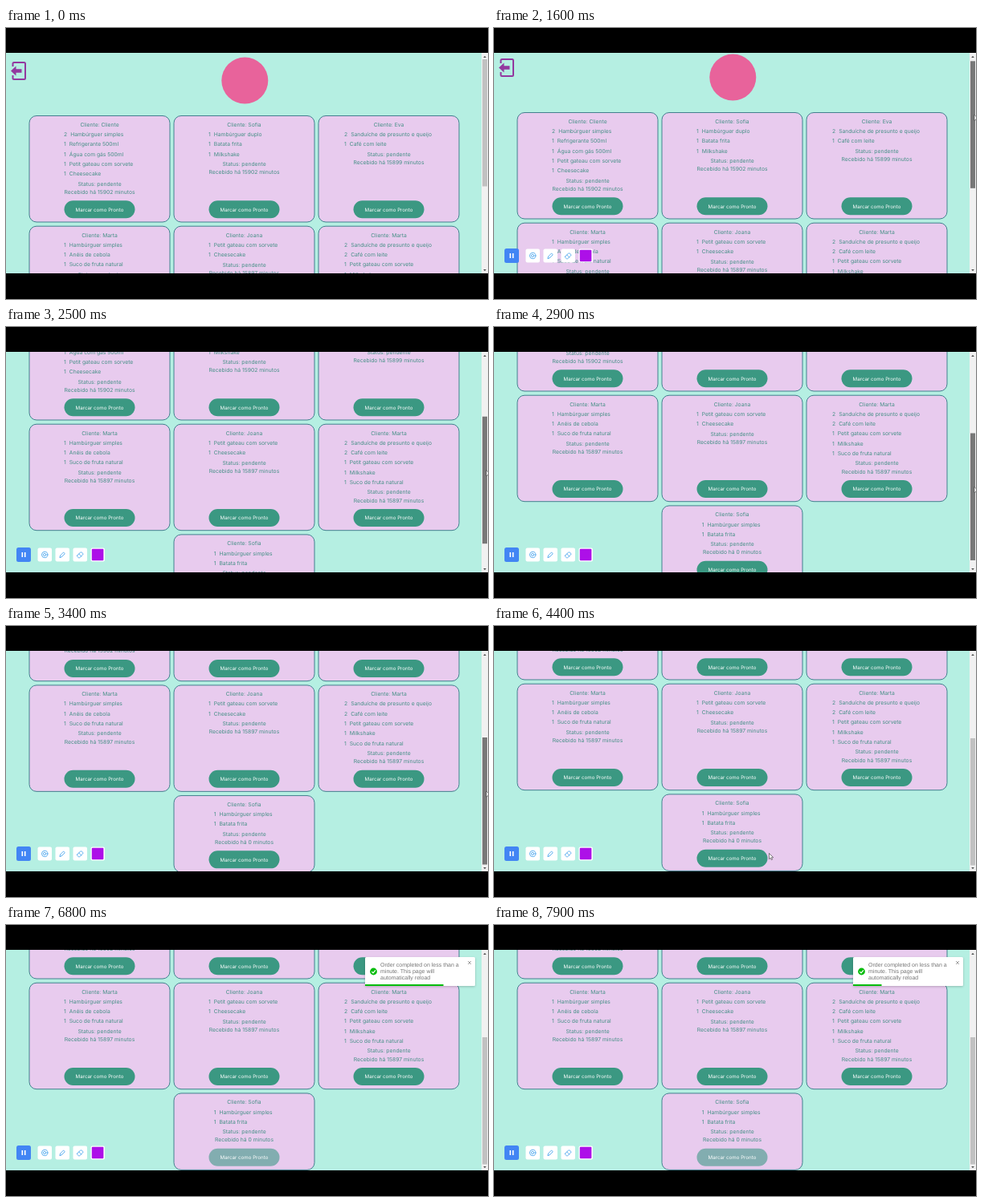
Animation of 600x338 px, one loop 8 s. Source, as an HTML page:

```html
<!DOCTYPE html>
<html lang="pt">
<head>
<meta charset="utf-8">
<title>Pedidos</title>
<style>
  html, body { margin: 0; width: 100%; height: 100%; overflow: hidden; background: #000; }
  svg { display: block; width: 100vw; height: 100vh; }
  text { font: 6.75px Inter, sans-serif; fill: #459086; text-rendering: geometricPrecision; }
  .mid { text-anchor: middle; }
  .card { fill: #e8cbee; stroke: #43808e; }
  .button { fill: #3b9882; }
  .label { font-size: 6.2px; fill: #fff; }
  .toast text { font: 7px "Liberation Sans", Arial, sans-serif; fill: #757575; }
  .line { fill: none; stroke: #4ba6ee; stroke-width: .9; stroke-linejoin: round; stroke-linecap: round; }
</style>
</head>
<body>
<svg viewBox="0 0 600 338">
  <defs>
    <clipPath id="view"><rect y="31" width="592" height="275"/></clipPath>
    <clipPath id="screen"><rect y="31" width="600" height="275"/></clipPath>
    <filter id="shadow" x="-10%" y="-30%" width="120%" height="170%">
      <feDropShadow dx="0" dy="1" stdDeviation="1.6" flood-opacity=".22"/>
    </filter>
  </defs>
  <rect width="600" height="338"/>
  <rect y="31" width="592" height="275" fill="#b5efe2"/>

  <g clip-path="url(#view)">
    <g id="page">
      <path d="M8.5 48V44.5Q8.5 43 10 43H22.5Q24 43 24 44.5V62.5Q24 64 22.5 64H10Q8.5 64 8.5 62.5V59"
            fill="none" stroke="#93389f" stroke-width="2"/>
      <path d="M6 53.5L12.5 47.5V51.3H19.5V55.7H12.5V59.5Z" fill="#93389f"/>
      <circle cx="297.3" cy="65.5" r="29" fill="#e8639b"/>
      <g id="cards"></g>
    </g>
  </g>

  <rect x="592" y="31" width="8" height="275" fill="#f1f1f1"/>
  <path d="M594.2 37L596 34.8L597.8 37Z" fill="#505050"/>
  <path d="M594.2 301L596 303.2L597.8 301Z" fill="#505050"/>
  <rect id="thumb" x="593" width="6" height="158.5"/>

  <g id="toolbar">
    <rect x="13" y="275" width="18" height="18" rx="2.5" fill="#4285f4"/>
    <path d="M20.3 281V287M23.7 281V287" stroke="#fff" stroke-width="1.6"/>
    <g fill="#fff">
      <rect x="39.5" y="275.5" width="17.5" height="17" rx="2"/>
      <rect x="61.5" y="275.5" width="17.5" height="17" rx="2"/>
      <rect x="83.5" y="275.5" width="17.5" height="17" rx="2"/>
      <rect x="105.5" y="275.5" width="17.5" height="17" rx="2"/>
    </g>
    <g class="line">
      <circle cx="48.2" cy="284" r="3.7"/>
      <circle cx="48.2" cy="284" r="1.6"/>
      <path d="M67 287.3L67.6 285L71.6 281L73.3 282.7L69.3 286.7Z"/>
      <path d="M88.7 285L92.7 281Q93.4 280.4 94.1 281L95.6 282.5Q96.2 283.2 95.6 284L91.7 287.7Q91 288.2 90.3 287.7L88.7 286.2Q88.2 285.6 88.7 285ZM90.7 283L93.7 286"/>
    </g>
    <rect x="106.8" y="276.8" width="14.6" height="14.4" rx="1" fill="#ad10e8"/>
  </g>

  <g clip-path="url(#view)">
    <g id="toast" class="toast">
      <rect x="447" y="40" width="137" height="36" rx="1.6" fill="#fff" filter="url(#shadow)"/>
      <circle cx="457.5" cy="58" r="4.4" fill="#07bc0c"/>
      <path d="M455.3 58.1L457 59.8L459.9 56.4" fill="none" stroke="#fff" stroke-width="1.2"/>
      <text x="466" y="52.3">Order completed on less than a</text>
      <text x="466" y="60.3">minute. This page will</text>
      <text x="466" y="68.2">automatically reload</text>
      <path d="M575 45L579 49M579 45L575 49" stroke="#8a8a8a" stroke-width=".8"/>
      <rect id="progress" x="447" y="74" width="137" height="2" fill="#07bc0c"/>
    </g>
  </g>

  <g clip-path="url(#screen)">
    <g id="cursor" fill="#fff" stroke="#333" stroke-width=".6" stroke-linejoin="round">
      <path id="arrow" d="M0 0V7.2L1.7 5.7L2.8 8.2L4 7.7L2.9 5.2H5.2Z"/>
      <path id="hand" d="M-.7 .6Q0 -.4 .7 .6V3.2L3.4 3.9Q4.2 4.2 4 5.2L3.4 8.6H-.6L-2.8 5.7Q-2.6 4.6 -.7 5.7Z"/>
    </g>
  </g>
</svg>

<script>
const LOOP = 8000, STEP = 100;
const $ = id => document.getElementById(id);
const show = (id, on) => $(id).setAttribute('display', on ? 'inline' : 'none');
const move = (id, x, y) => $(id).setAttribute('transform', `translate(${x} ${y})`);

// Each order: column, row, client, minutes waiting, left edge of list, items
const burger = 'Hambúrguer simples', cake = 'Petit gateau com sorvete', juice = 'Suco de fruta natural';
const sandwich = 'Sanduíche de presunto e queijo', coffee = 'Café com leite';
const orders = [
  [0, 0, 'Cliente', 15902, 72, ['2' + burger, '1Refrigerante 500ml', '1Água com gás 500ml', '1' + cake, '1Cheesecake']],
  [1, 0, 'Sofia', 15902, 252, ['1Hambúrguer duplo', '1Batata frita', '1Milkshake']],
  [2, 0, 'Eva', 15899, 421, ['2' + sandwich, '1' + coffee]],
  [0, 1, 'Marta', 15897, 72, ['1' + burger, '1Anéis de cebola', '1' + juice]],
  [1, 1, 'Joana', 15897, 252, ['1' + cake, '1Cheesecake']],
  [2, 1, 'Marta', 15897, 421, ['2' + sandwich, '2' + coffee, '1' + cake, '1Milkshake', '1' + juice]],
  [1, 2, 'Sofia', 0, 258.7, ['1' + burger, '1Batata frita']]
];

function card([column, row, client, minutes, left, items]) {
  const x = 29 + column * 180, y = 109.5 + row * 137.7, mid = x + 87.5;
  const height = row < 2 ? 132.5 : 95.5;
  const button = y + height - 26.7;
  const centered = (dy, text) => `<text class="mid" x="${mid}" y="${y + dy}">${text}</text>`;
  const end = 25.6 + items.length * 12.3;
  return `<rect class="card" x="${x}" y="${y}" width="175" height="${height}" rx="9"/>`
    + centered(13.3, 'Cliente: ' + client)
    + items.map((item, i) =>
        `<text x="${left}" y="${y + 25.6 + i * 12.3}">${item[0]}<tspan dx="4">${item.slice(1)}</tspan></text>`).join('')
    + centered(end + .1, 'Status: pendente')
    + centered(end + 10.2, `Recebido há ${minutes} minutos`)
    + `<rect class="button" x="${mid - 44}" y="${button}" width="88" height="22" rx="11"/>`
    + `<text class="mid label" x="${mid}" y="${button + 13.2}">Marcar como Pronto</text>`;
}
$('cards').innerHTML = orders.map(card).join('');
const lastButton = [...document.querySelectorAll('.button')].pop();

// Interpolates between [time, value] keys
function track(keys, t, ease = p => p) {
  const next = keys.findIndex(key => key[0] > t);
  if (next === 0) return keys[0][1];
  if (next < 0) return keys[keys.length - 1][1];
  const [t0, a] = keys[next - 1], [t1, b] = keys[next];
  return a + (b - a) * ease((t - t0) / (t1 - t0));
}
const easeOut = p => 1 - (1 - p) ** 3;

const scrollKeys = [[1500, 0], [1600, 4], [1700, 18], [2000, 85], [2100, 98], [2200, 98],
  [2500, 126], [2900, 162], [3200, 170], [3500, 175]];
const cursorX = [[300, 560], [600, 598], [3600, 598], [4000, 470], [4200, 470], [4400, 342.5], [4800, 301.5], [5900, 301.5], [6300, 312]];
const cursorY = [[3600, 207], [4000, 262], [4200, 262], [4400, 283.5], [4800, 294.5], [5900, 294.5], [6300, 310]];
const TOAST = 6100, TOAST_LIFE = 2430, CLICK = 5900;
const bounce = [[0, 1200], [420, -10], [525, 4], [630, -2], [700, 0]];

function draw(t) {
  const scroll = track(scrollKeys, t), thumbY = 39 + scroll * .577;
  move('page', 0, -scroll);
  $('thumb').setAttribute('y', thumbY);
  $('thumb').setAttribute('fill', t >= 1400 && t < 3600 ? '#787878' : '#c1c1c1');
  show('toolbar', t >= 100);

  const x = track(cursorX, t), y = t < 3600 ? thumbY + 67 : track(cursorY, t);
  const onButton = t >= 4400 && x < 340;
  show('cursor', t >= 300 && t < 6300);
  show('arrow', !onButton);
  show('hand', onButton);
  move('cursor', x, y);
  lastButton.style.fill = t >= CLICK ? '#82adb0' : '';

  const age = t - TOAST;
  show('toast', age >= 0);
  move('toast', track(bounce, age, easeOut), 0);
  $('progress').setAttribute('width', 137 * Math.min(1, Math.max(0, 1 - age / TOAST_LIFE)));
}

const start = performance.now();
function frame() {
  const t = (performance.now() - start) % LOOP;
  draw(Math.floor(t / STEP) * STEP);
  requestAnimationFrame(frame);
}
frame();
</script>
</body>
</html>
```
